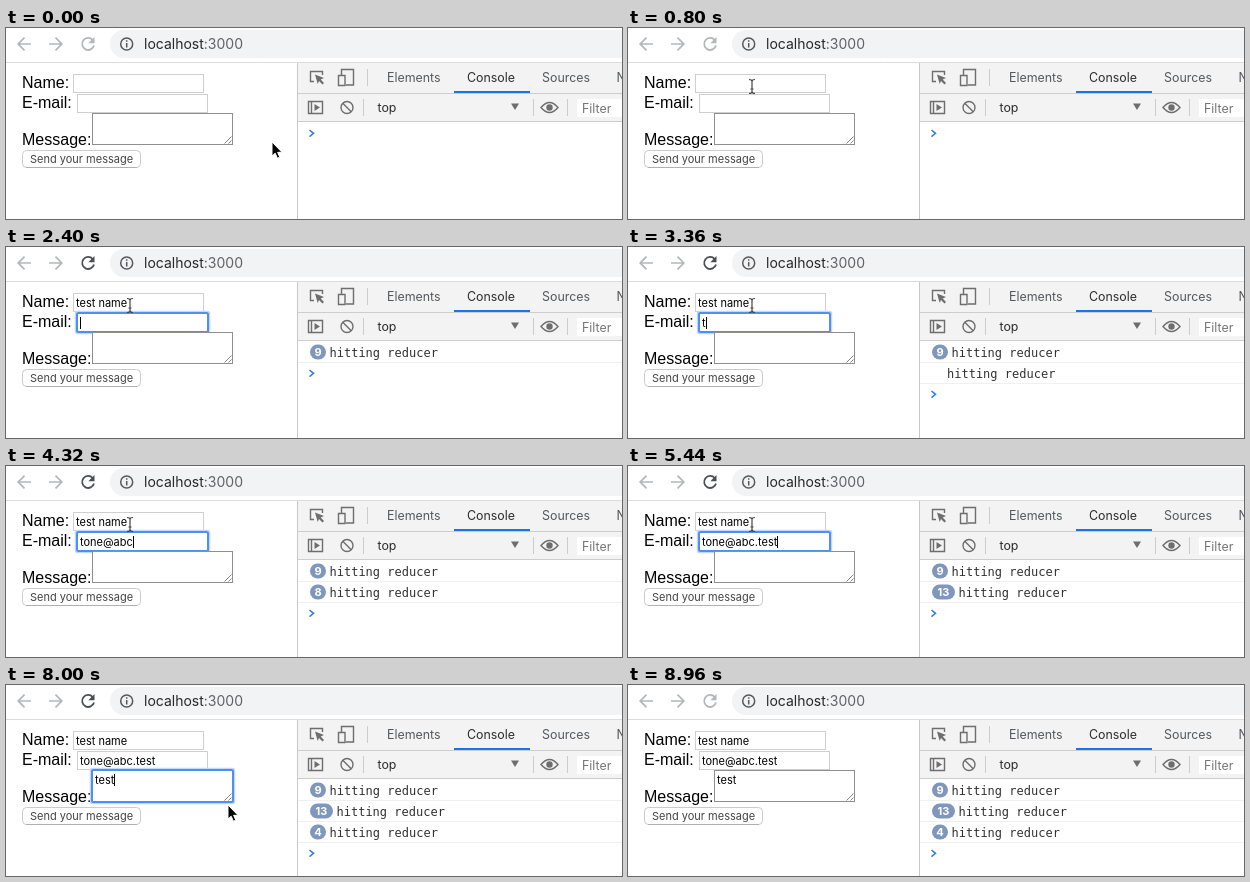
These frames come from a looping animation (616x191 px, 9280 ms). An HTML page:

```html
<!DOCTYPE html>
<html lang="en">
<head>
<meta charset="utf-8">
<title>Contact form</title>
<style>
  html, body { margin: 0; width: 100%; height: 100%; overflow: hidden; background: #fff; }
  svg { display: block; width: 616px; height: 191px; }
  text { white-space: pre; }
  .ui { font: 12.4px Inter, sans-serif; fill: #55585c; }
  .ui .active { fill: #2d2d2d; }
  .url { font: 14px Inter, sans-serif; fill: #26282b; }
  .url tspan { fill: #5f6368; }
  .label { font: 16px "Liberation Sans", Arial, sans-serif; fill: #000; }
  .field { font: 11px Inter, sans-serif; fill: #000; }
  .log { font: 12px "DejaVu Sans Mono", monospace; fill: #303030; }
  .count { font: bold 11px Inter, sans-serif; fill: #fff; text-anchor: middle; }
  .line { fill: none; stroke: #6e6e6e; stroke-width: 1.4; }
  .info { fill: none; stroke: #55595e; stroke-width: 1.5; }
  .nav { fill: none; stroke: #b4b6b9; stroke-width: 1.7; }
  #reload { color: #b4b6b9; }
  #reload.on { color: #4b4f54; }
</style>
</head>
<body>
<svg id="stage" viewBox="0 0 616 191">
  <!-- browser bar -->
  <rect width="616" height="35" fill="#fff"/>
  <rect x="104" y="2" width="540" height="28" rx="14" fill="#f1f3f4"/>
  <path d="M0 34.500H616" stroke="#dcdcdc"/>
  <path class="nav" d="M25 16H12.500M18.500 9.700L12.200 16L18.500 22.300M43 16H55.500M49.500 9.700L55.800 16L49.500 22.300"/>
  <g id="reload">
    <path d="M86.700 12A6 6 0 1 0 88 17.500" fill="none" stroke="currentColor" stroke-width="1.8"/>
    <path d="M88.500 9V15.200H82.300Z" fill="currentColor"/>
  </g>
  <g class="info">
    <circle cx="120.700" cy="16" r="6"/>
    <path d="M120.700 15V19.500M120.700 12.300V13.800"/>
  </g>
  <text class="url" x="138" y="21">localhost<tspan>:3000</tspan></text>

  <!-- developer tools -->
  <rect x="292" y="35" width="324" height="59" fill="#f3f3f3"/>
  <path d="M291.500 35V191" stroke="#c8c8c8"/>
  <path d="M292 65.500H616M292 93.500H616" stroke="#cdcdcd"/>
  <path d="M361.500 41V58M357.500 71V88M527.500 71V88M561.500 71V88" stroke="#ccc"/>
  <rect x="448" y="63" width="76" height="2" fill="#1a73e8"/>
  <path class="line" d="M308 53.500H304.500V43.500H316.500V47"/>
  <path d="M309 46.500L318 50L314.700 51.500L318 55L316.500 56.500L313 53L311.700 56Z" fill="#6e6e6e"/>
  <path class="line" d="M335.500 47V41.500H347.500V57H340M332.500 47.500H339V57.500H332.500Z"/>
  <g class="ui">
    <text x="381" y="53.500">Elements</text>
    <text x="461" y="53.500" class="active">Console</text>
    <text x="536" y="53.500">Sources</text>
    <text x="610.500" y="53.500">Network</text>
    <text x="371.500" y="83.500" class="active">top</text>
  </g>
  <path class="line" d="M302.500 73.500H316.500V85.500H302.500ZM305.500 73.500V85.500"/>
  <path d="M308.500 76L314 79.500L308.500 83Z" fill="#6e6e6e"/>
  <g class="line">
    <circle cx="341" cy="79.500" r="6"/>
    <path d="M336.800 75.300L345.200 83.700"/>
  </g>
  <path d="M505 75.500H513L509 82Z" fill="#6e6e6e"/>
  <path class="line" d="M535 79.500Q543.500 69.500 552 79.500Q543.500 89.500 535 79.500Z"/>
  <circle cx="543.500" cy="79.500" r="3.200" fill="#6e6e6e"/>
  <rect x="571" y="71" width="60" height="18" fill="#fff"/>
  <text class="ui" x="576" y="84.500" style="fill:#757575">Filter</text>
  <g id="console"></g>
  <path id="prompt" d="M303.500 102L307.500 105.300L303.500 108.600" fill="none" stroke="#367cf1" stroke-width="1.600"/>

  <!-- form -->
  <g class="label">
    <text x="16" y="60">Name:</text>
    <text x="16" y="80">E-mail:</text>
    <text x="16" y="117">Message:</text>
  </g>
  <rect x="16.500" y="122.500" width="118" height="17" rx="4" fill="#fff" stroke="#cbcbcb"/>
  <path d="M20 139.500H131" stroke="#b0b0b0"/>
  <text class="field" x="24" y="135" style="fill:#444">Send your message</text>
  <g id="fields"></g>
  <path d="M218.500 115.500L225.500 108.500M222.500 115.500L225.500 112.500" stroke="#777" stroke-width=".9"/>

  <path id="caret" stroke="#000" d="M0 0V12"/>
  <path id="arrow" d="M0 0V14L3.200 11.200L5.400 16.200L7.800 15.200L5.600 10.300H10Z" fill="#000" stroke="#fff"/>
  <path id="beam" d="M-3 -7Q0 -7 0 -5Q0 -7 3 -7M0 -5.500V5.500M-3 7Q0 7 0 5Q0 7 3 7M-1.500 2.500H1.500" fill="none" stroke="#444" stroke-width="1.200"/>
</svg>
<script>
const LOOP = 9280;
const $ = id => document.getElementById(id);

function add(parent, tag, attrs) {
  const node = document.createElementNS('http://www.w3.org/2000/svg', tag);
  for (const key in attrs) node.setAttribute(key, attrs[key]);
  parent.append(node);
  return node;
}
const show = (node, on) => node.style.display = on ? '' : 'none';
const move = (node, x, y) => node.setAttribute('transform', `translate(${x} ${y})`);

const fields = {
  name: { text: 'test name', x: 67, y: 46, w: 131, h: 19, base: 60, edge: '#cfcfcf' },
  mail: { text: 'tone@abc.test', x: 71, y: 66, w: 131, h: 19, base: 80, edge: '#cfcfcf' },
  note: { text: 'test', x: 86, y: 85, w: 141, h: 32, base: 99, edge: '#8f8f8f' }
};
const order = Object.keys(fields);

order.forEach((key, row) => {
  const f = fields[key];
  add($('fields'), 'rect', { x: f.x + .5, y: f.y + .5, width: f.w - 1, height: f.h - 1, fill: '#fff', stroke: f.edge });
  f.ring = add($('fields'), 'g', { fill: 'none' });
  [[1, '#c0d8fb', 2.5], [0, '#4f8ff0', 2]].forEach(([out, stroke, width]) =>
    add(f.ring, 'rect', { x: f.x - out, y: f.y - out, width: f.w + 2 * out, height: f.h + 2 * out, rx: 1.5, stroke, 'stroke-width': width }));
  f.label = add($('fields'), 'text', { class: 'field', x: f.x + 3, y: f.base });

  const y = 105 + 21 * row;
  f.row = add($('console'), 'g', {});
  add(f.row, 'path', { d: `M292 ${y + 10.5}H616`, stroke: '#f0f0f0' });
  f.badge = add(f.row, 'rect', { x: 304, y: y - 7.5, height: 15, rx: 7.5, fill: '#8097bd' });
  f.count = add(f.row, 'text', { class: 'count', y: y + 4 });
  f.log = add(f.row, 'text', { class: 'log', y: y + 4.5 });
  f.log.textContent = 'hitting reducer';
});

// Each step lists only what changes; name, mail and note are typed lengths.
const steps = [
  [0, { name: 0, mail: 0, note: 0, focus: '', caret: 0, mouse: ['arrow', 266, 114] }],
  [160, { mouse: ['arrow', 252, 106] }],
  [320, { mouse: ['arrow', 212, 86] }],
  [480, { mouse: ['arrow', 162, 68] }],
  [640, { mouse: ['beam', 133, 60] }],
  [800, { mouse: ['beam', 124, 58.5] }],
  [960, { focus: 'name', caret: 1 }],
  [1440, { name: 2 }],
  [1600, { name: 4 }],
  [1760, { name: 6 }],
  [1920, { name: 7 }],
  [2080, { name: 9 }],
  [2400, { focus: 'mail' }],
  [2880, { caret: 0 }],
  [3360, { mail: 1, caret: 1 }],
  [3520, { mail: 2 }],
  [3680, { mail: 4 }],
  [3840, { mail: 5 }],
  [4160, { mail: 6 }],
  [4320, { mail: 8 }],
  [4480, { mail: 9 }],
  [4960, { mail: 10 }],
  [5120, { mail: 11 }],
  [5280, { mail: 12 }],
  [5440, { mail: 13 }],
  [5920, { focus: 'note' }],
  [6400, { note: 1 }],
  [6560, { note: 3 }],
  [6720, { note: 4 }],
  [7200, { caret: 0 }],
  [7680, { caret: 1 }],
  [8000, { mouse: ['arrow', 222, 120] }],
  [8160, { caret: 0, mouse: ['arrow', 221, 134] }],
  [8320, { mouse: ['arrow', 222, 152] }],
  [8480, { mouse: ['arrow', 224, 170] }],
  [8640, { caret: 1, mouse: ['none', 0, 0] }],
  [8960, { focus: '', caret: 0 }]
];

function render(time) {
  const state = Object.assign({}, ...steps.filter(([at]) => at <= time).map(([, change]) => change));
  let rows = 0;
  for (const key of order) {
    const f = fields[key], n = state[key];
    f.label.textContent = f.text.slice(0, n);
    show(f.ring, state.focus === key);
    show(f.row, n > 0);
    show(f.badge, n > 1);
    show(f.count, n > 1);
    const width = n > 9 ? 23 : 16;
    f.badge.setAttribute('width', width);
    f.count.setAttribute('x', 304 + width / 2);
    f.count.textContent = n;
    f.log.setAttribute('x', n > 1 ? 307.5 + width : 319);
    if (n) rows++;
  }
  move($('prompt'), 0, 21 * rows);

  // The reload button is dark only while the window is active.
  const active = fields[state.focus];
  $('reload').classList.toggle('on', Boolean(active));
  show($('caret'), active && state.caret);
  if (active) {
    const end = active.x + 3 + active.label.getComputedTextLength();
    move($('caret'), Math.round(end) + .5, active.base - 10);
  }
  const [shape, x, y] = state.mouse;
  for (const id of ['arrow', 'beam']) {
    show($(id), id === shape);
    move($(id), x, y);
  }
}

const start = performance.now();
function tick() {
  render((performance.now() - start) % LOOP);
  requestAnimationFrame(tick);
}
tick();
</script>
</body>
</html>
```
